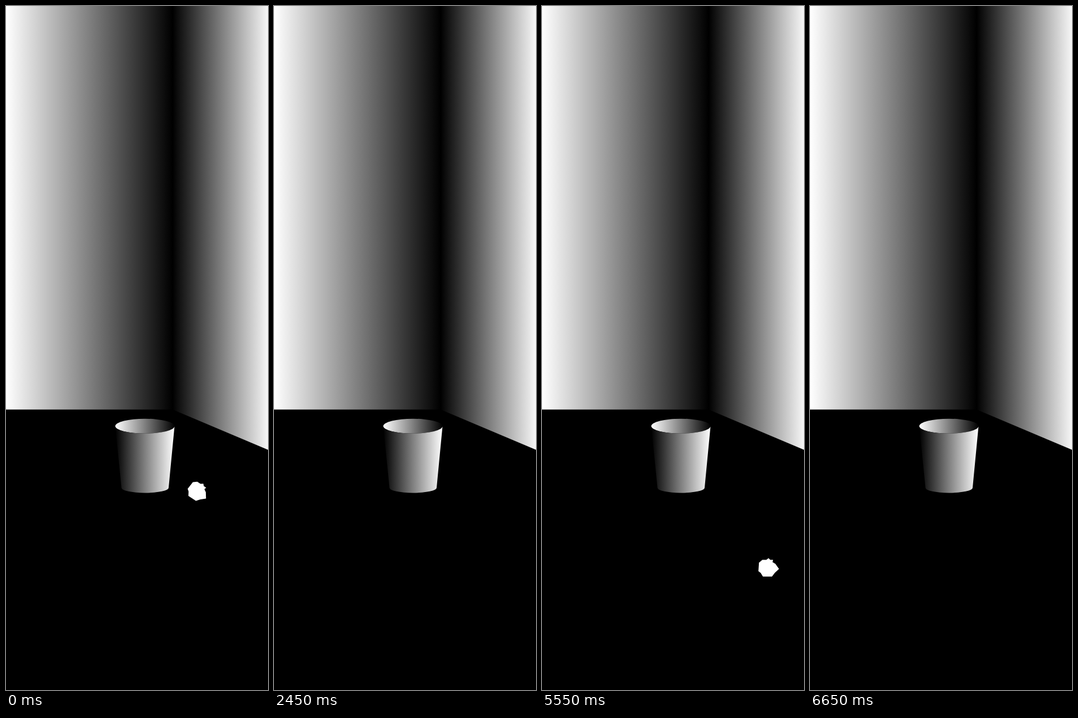
Animation of 464x1206 px, one loop 8 s. Source, as an HTML page:

```html
<!DOCTYPE html>
<html lang="en">
<head>
<meta charset="utf-8">
<title>Paper ball and bin</title>
<style>
  html, body { margin: 0; width: 100%; height: 100%; overflow: hidden; background: #000; }
  svg { display: block; width: 100%; height: 100%; }
</style>
</head>
<body>
<svg viewBox="0 0 464 1206">
  <defs>
    <linearGradient id="fade"><stop stop-color="#fff"/><stop offset="1"/></linearGradient>
    <linearGradient id="rise"><stop/><stop offset="1" stop-color="#fff"/></linearGradient>
  </defs>
  <rect width="464" height="1206"/>
  <path d="M0 0H295V711.6H0Z" fill="url(#fade)"/>
  <path d="M295 0H470V785L295 711.6Z" fill="url(#rise)"/>
  <ellipse cx="246" cy="740.7" rx="52.5" ry="13" fill="url(#fade)"/>
  <path id="ball" fill="#fff" d="M-18 6L-17-9L-11-14L-4-14L0-17L3-14L8-14L7-10L12-7L18.5 2L11 9L6 15.5H-10L-14 9Z"/>
  <path fill="url(#rise)" d="M193.5 740.7A52.5 13 0 0 0 298.5 740.7L288 849.5A41.75 9 0 0 1 204.5 849.5Z"/>
</svg>
<script>
  const LOOP = 8000, FPS = 9, DELAY = 85; // motion advances in steps, nine a second
  const RIM = 760;                        // a falling ball below this is inside the bin
  const ball = document.getElementById('ball');

  const mix = (a, b, p) => a + (b - a) * p;
  const span = (n, from, to) => Math.min(1, Math.max(0, (n - from) / (to - from)));
  const smooth = p => p * p * (3 - 2 * p);

  function fall(n, start, x, y, angle) {
    const k = Math.max(0, n - start);
    return [x, y + 2.3 * k ** 3, angle + 20 * k];
  }

  // Place and angle of the ball at step n
  function pose(n) {
    if (n < 13) { // lift from the floor
      const p = span(n, 8, 12);
      return [mix(340, 263.5, p ** 4), mix(856.4, 564, smooth(p)), 34];
    }
    if (n < 16) { // sink a little above the bin
      const p = span(n, 13, 15);
      return [mix(263.5, 257.3, p), mix(564, 583.8, p), 34];
    }
    if (n < 39) return fall(n, 16, 257, 583.8, 34);
    if (n < 48) { // fly out of the bin
      const p = span(n, 39, 42);
      return [mix(259.5, 420.5, p ** 0.6), mix(744.5, 1077.5, p ** 1.6), mix(180, 360, Math.sqrt(p))];
    }
    if (n < 51) { // lift again
      return [mix(420.5, 217.5, smooth(span(n, 48.53, 51))),
              mix(1077.5, 525, smooth(span(n, 48.43, 50.7))), 0];
    }
    if (n < 55) { // swing over the bin
      const p = span(n, 51, 55);
      return [mix(217.5, 240.5, p ** 4), mix(525, 583, p ** 1.75), 0];
    }
    return fall(n, 54.6, 240.5, 583, 0);
  }

  function draw(now) {
    const n = Math.floor((now % LOOP - DELAY) * FPS / 1000);
    const [x, y, angle] = pose(n);
    const inside = y > RIM && (n > 16 && n < 39 || n > 55);
    ball.style.display = inside ? 'none' : '';
    ball.setAttribute('transform', `translate(${x} ${y}) rotate(${angle})`);
  }

  const start = performance.now();
  function tick() {
    draw(performance.now() - start);
    requestAnimationFrame(tick);
  }
  tick();
</script>
</body>
</html>
```
